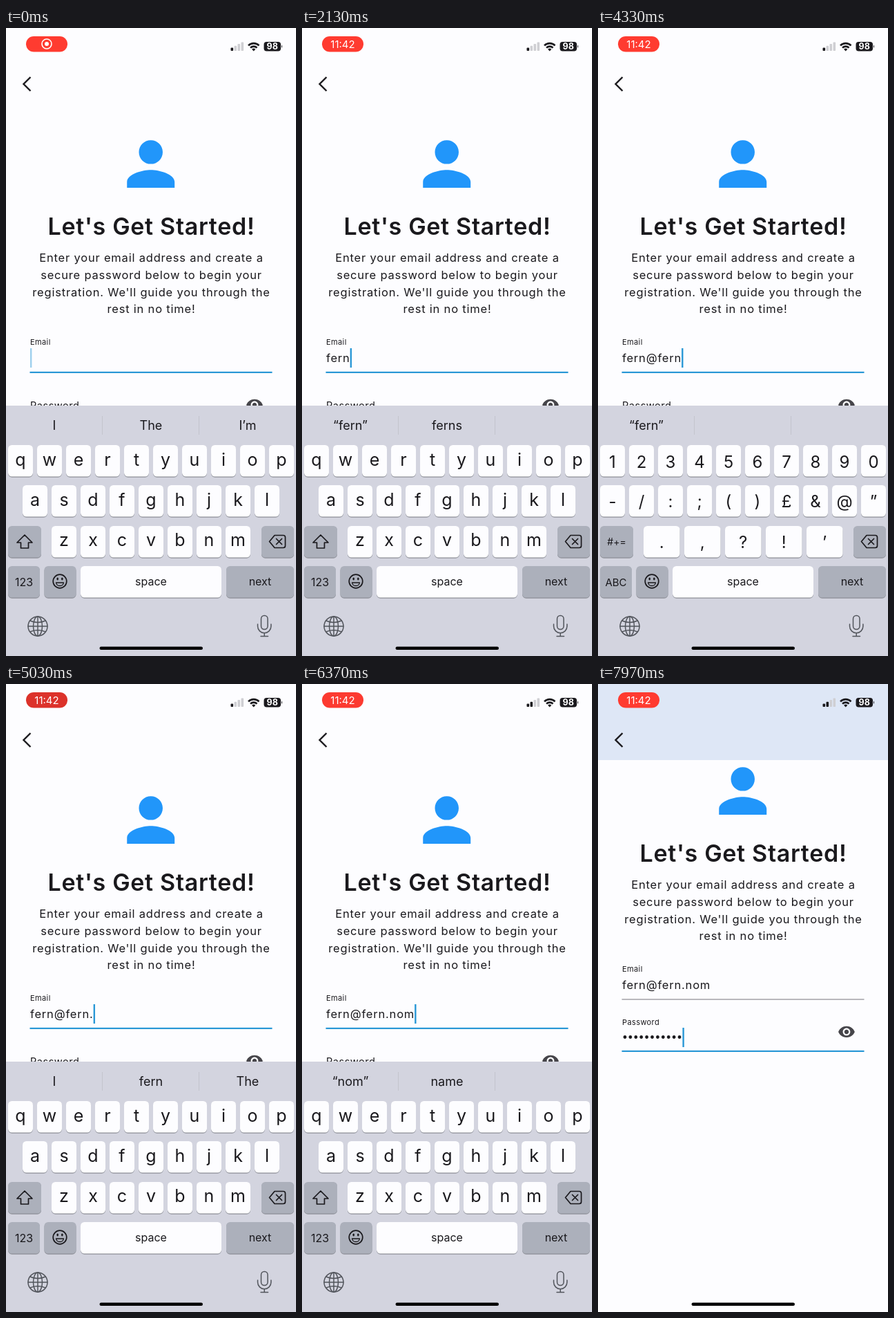
An HTML page that plays this animation: 420 px wide and 908 px high, repeating every 8 s.

```html
<!DOCTYPE html>
<html lang="en">
<head>
<meta charset="utf-8">
<title>Sign-up form</title>
<style>
  html, body { margin: 0; width: 100%; height: 100%; overflow: hidden; background: #fdfdff; }
  svg { display: block; width: 420px; height: 908px; font-family: Inter, Roboto, sans-serif; fill: #1a191d; }
  .mid { text-anchor: middle; }
  .title { font-size: 34px; font-weight: 600; letter-spacing: .7px; }
  .body { font-size: 16.5px; letter-spacing: .8px; }
  .label { font-size: 11px; letter-spacing: .4px; }
  .line { fill: none; stroke: #1a191d; stroke-linecap: round; stroke-linejoin: round; }
  .soft { stroke: #52555c; stroke-width: 1.5; }
</style>
</head>
<body>
<svg id="stage" viewBox="0 0 420 908">
  <rect width="420" height="908" fill="#fdfdff"/>
  <rect id="bar" width="420" height="110" fill="#dee7f6"/>

  <g id="page">
    <path transform="translate(158 144.9) scale(4.31)" fill="#2196fa" d="M12 12c2.21 0 4-1.79 4-4s-1.79-4-4-4-4 1.79-4 4 1.79 4 4 4zm0 2c-2.67 0-8 1.34-8 4v2h16v-2c0-2.66-5.33-4-8-4z"/>
    <text class="mid title" x="210.5" y="299">Let's Get Started!</text>
    <g class="mid body">
      <text x="210.500" y="338">Enter your email address and create a</text>
      <text x="210.500" y="362.700">secure password below to begin your</text>
      <text x="210.500" y="387.500">registration. We'll guide you through the</text>
      <text x="210.500" y="412.300">rest in no time!</text>
    </g>
    <text class="label" x="35" y="458">Email</text>
    <text class="body" id="email" x="35" y="483"></text>
    <rect id="emailLine" x="34.5" width="351"/>
    <text class="label" id="passLabel">Password</text>
    <g id="dots"></g>
    <rect id="passLine" x="34.5" width="351"/>
    <path transform="translate(347 532) scale(1.08)" fill="#46454a" d="M12 4.5C7 4.5 2.73 7.61 1 12c1.73 4.39 6 7.5 11 7.5s9.27-3.11 11-7.5c-1.73-4.39-6-7.5-11-7.5zM12 17c-2.76 0-5-2.24-5-5s2.24-5 5-5 5 2.24 5 5-2.24 5-5 5zm0-8c-1.66 0-3 1.34-3 3s1.34 3 3 3 3-1.34 3-3-1.34-3-3-3z"/>
    <rect id="cursor" width="2.4" height="28" fill="#2a98d6"/>
  </g>

  <path class="line" stroke-width="2.4" style="stroke-linecap:butt;stroke-linejoin:miter" d="M35.500 71 25.500 81 35.500 91"/>
  <rect id="pill" x="29" y="12" width="60" height="22.500" rx="11.2"/>
  <g id="record">
    <circle cx="59" cy="23" r="7" fill="none" stroke="#fff" stroke-width="1.6"/>
    <circle cx="59" cy="23" r="3" fill="#fff"/>
  </g>
  <text class="mid" id="clock" x="59" y="28.500" font-size="15" fill="#fff">11:42</text>
  <g id="signal"></g>
  <g class="line" stroke-width="2.6" style="stroke-linecap:butt">
    <path d="M351 25.300a11 11 0 0 1 15.500 0M354 28.600a6.700 6.700 0 0 1 9.500 0"/>
  </g>
  <path d="M358.700 33.500l-2.600-2.700a3.700 3.700 0 0 1 5.200 0z"/>
  <rect x="373.500" y="20" width="24.500" height="13.500" rx="4"/>
  <path d="M399 24.500q2 2.200 0 4.500z"/>
  <text class="mid" x="385.700" y="31.300" font-size="12.500" font-weight="700" fill="#fff">98</text>

  <g id="keyboard">
    <rect y="546" width="420" height="362" fill="#d3d4df"/>
    <path d="M139.500 561v27M279.500 561v27" stroke="#c3c4cd"/>
    <g id="hints" class="mid" font-size="18"></g>
    <g id="letters"></g>
    <g id="symbols"></g>
    <g id="common"></g>
    <g class="line" stroke-width="1.700">
      <path d="M389 733.500h12.500q3 0 3 3v12q0 3-3 3h-12.500l-7.500-9zM391.500 738.500l8 8M399.500 738.500l-8 8"/>
      <circle cx="78" cy="800" r="9.800"/>
      <path d="M72.500 802h11q-.8 4.500-5.500 4.500t-5.500-4.500z" stroke-width="1.300"/>
    </g>
    <ellipse cx="74.700" cy="796.500" rx="1.300" ry="1.900"/>
    <ellipse cx="81.300" cy="796.500" rx="1.300" ry="1.900"/>
    <g class="line soft">
      <circle cx="46" cy="865" r="14"/>
      <ellipse cx="46" cy="865" rx="6.500" ry="14"/>
      <path d="M46 851v28M32 865h28M35 857q11 5 22 0M35 873q11-5 22 0"/>
      <rect x="369.500" y="849.500" width="9.500" height="20" rx="4.700"/>
      <path d="M364.500 862v3a9.700 9.700 0 0 0 19.400 0v-3M374.200 875v4.500M369 879.500h10.500"/>
    </g>
  </g>
  <rect x="135.500" y="894.500" width="149.500" height="4.500" rx="2.250" fill="#000"/>
</svg>

<script>
const LOOP = 8000;
const NEXT = 6430;          // keyboard leaves, focus moves on
const $ = id => document.getElementById(id);

function add(parent, tag, attrs, text = '') {
  const el = document.createElementNS('http://www.w3.org/2000/svg', tag);
  set(el, attrs);
  el.textContent = text;
  return parent.appendChild(el);
}
function set(el, attrs) {
  for (const name in attrs) el.setAttribute(name, attrs[name]);
}

function key(parent, x, y, w, text, size, baseline, dark) {
  add(parent, 'rect', { x, y: y + 1.2, width: w, height: 45.5, rx: 5.5, fill: '#8d8f97' });
  add(parent, 'rect', { x, y, width: w, height: 45.5, rx: 5.5, fill: dark ? '#acb0bb' : '#fdfdff' });
  add(parent, 'text', { x: x + w / 2, y: y + baseline, 'font-size': size, class: 'mid' }, text);
}
function row(parent, chars, x, y, w, pitch, size, baseline) {
  [...chars].forEach((c, i) => key(parent, x + i * pitch, y, w, c, size, baseline));
}

const letters = $('letters'), symbols = $('symbols'), common = $('common');
row(letters, 'qwertyuiop', 3, 603, 36, 42, 25, 30);
row(letters, 'asdfghjkl', 24, 661, 36, 42, 25, 30);
row(letters, 'zxcvbnm', 66, 720, 36, 42, 25, 29);
key(letters, 3, 720, 48, '', 16, 28, true);
key(letters, 3, 778, 46, '123', 16, 28.5, true);
add(letters, 'path', { class: 'line', 'stroke-width': 1.7, d: 'M27 733 38 744H32.500V752H21.500V744H16z' });
row(symbols, '1234567890', 3, 603, 36, 42, 24, 33);
row(symbols, '-/:;()£&@”', 3, 661, 36, 42, 24, 32);
row(symbols, '.,?!’', 66, 720, 52.5, 59, 24, 32);
key(symbols, 3, 720, 48, '#+=', 14, 28, true);
key(symbols, 3, 778, 46, 'ABC', 15, 28.5, true);
key(common, 370, 720, 47, '', 16, 28, true);
key(common, 55.5, 778, 46, '', 16, 28, true);
key(common, 108, 778, 204, 'space', 16, 27.5);
key(common, 319, 778, 98, 'next', 16, 27.5, true);

const hints = [70, 210, 350].map(x => add($('hints'), 'text', { x, y: 581 }));
const bars = [0, 1, 2, 3].map(i =>
  add($('signal'), 'rect', { x: 325.5 + i * 5, y: 28.5 - i * 2.7, width: 3.6, height: 4.5 + i * 2.7, rx: 1 }));
const dots = Array.from({ length: 11 }, (_, i) =>
  add($('dots'), 'circle', { cx: 39 + i * 7.9, cy: 552.5, r: 2.4 }));

// time, typed text, suggestions, symbol layout
const steps = [
  [-766, '', 'I|The|I’m', 0],
  [900, 'f', '“f”|for|from', 0],
  [1250, 'fe', '“fe”|feel|few', 0],
  [1600, 'fer', '“fer”|ferry|', 0],
  [2050, 'fern', '“fern”|ferns|', 0],
  [2350, 'fern', '“fern”|ferns|', 1],
  [2900, 'fern@', 'the|your|results', 1],
  [3180, 'fern@', 'the|your|results', 0],
  [3480, 'fern@f', '“f”|for|from', 0],
  [3680, 'fern@fe', '“fe”|feel|few', 0],
  [3880, 'fern@fer', '“fer”|ferry|', 0],
  [4060, 'fern@fern', '“fern”||', 0],
  [4220, 'fern@fern', '“fern”||', 1],
  [4620, 'fern@fern.', 'I|fern|The', 1],
  [4880, 'fern@fern.', 'I|fern|The', 0],
  [5300, 'fern@fern.n', '“n”|new|not', 0],
  [5600, 'fern@fern.no', '“no”|not|now', 0],
  [5950, 'fern@fern.nom', '“nom”|name|', 0],
];
const DOT_START = 6800, DOT_GAP = 100;
const PULSES = [1630, 3330, 5030, 6730];

const clamp = v => Math.min(1, Math.max(0, v));
const ease = (t, from, to) => {
  const p = clamp((t - from) / (to - from));
  return p * p * (3 - 2 * p);
};
const mix = (a, b, p) => a + (b - a) * p;
const show = (el, on) => { el.style.display = on ? '' : 'none'; };

function underline(el, y, focused) {
  set(el, { y: focused ? y - 1.2 : y - .5, height: focused ? 2.2 : 1, fill: focused ? '#2a98d6' : '#76757c' });
}

function draw(t) {
  const step = steps.filter(s => s[0] <= t).pop();
  const onPass = t >= NEXT + 120;
  const scroll = ease(t, 6600, 6830);
  const float = ease(t, 6550, 6740);
  const count = Math.max(0, Math.min(11, Math.floor((t - DOT_START) / DOT_GAP) + 1));

  $('email').textContent = step[1];
  step[2].split('|').forEach((word, i) => { hints[i].textContent = word; });
  show(letters, !step[3]);
  show(symbols, step[3]);
  set($('keyboard'), { transform: `translate(0 ${364 * ease(t, NEXT, 6670)})` });

  set($('page'), { transform: `translate(0 ${-42 * scroll})` });
  set($('bar'), { opacity: scroll });
  set($('passLabel'), { transform: `translate(35 ${mix(551, 534.5, float)}) scale(${mix(1.32, 1, float)})` });
  underline($('emailLine'), 498, !onPass);
  underline($('passLine'), 573, onPass);
  dots.forEach((dot, i) => show(dot, i < count));

  let lastKey = step[0], x = 35 + (step[1] ? $('email').getComputedTextLength() : 0);
  if (onPass) {
    lastKey = count ? DOT_START + (count - 1) * DOT_GAP : NEXT + 120;
    x = count ? 35.5 + count * 7.9 : 35;
  }
  const idle = t - lastKey - 500;
  set($('cursor'), {
    x, y: onPass ? 539 : 463,
    opacity: idle < 0 ? 1 : .5 + .5 * Math.cos(idle / 500 * Math.PI),
  });

  const dim = Math.max(...PULSES.map(p => 1 - ease(Math.abs(t - p), 60, 420)));
  set($('pill'), { fill: `rgb(${mix(255, 220, dim)},${mix(59, 50, dim)},${mix(48, 42, dim)})` });
  const clock = ease(t, 400, 700);
  set($('record'), { opacity: 1 - clock });
  set($('clock'), { opacity: clock });
  const level = t < 5600 ? 1 : 2;
  bars.forEach((bar, i) => set(bar, { fill: i < level ? '#1a191d' : '#cfcfd3' }));
}

const start = performance.now();
function tick() {
  draw((performance.now() - start) % LOOP);
  requestAnimationFrame(tick);
}
tick();
</script>
</body>
</html>
```
